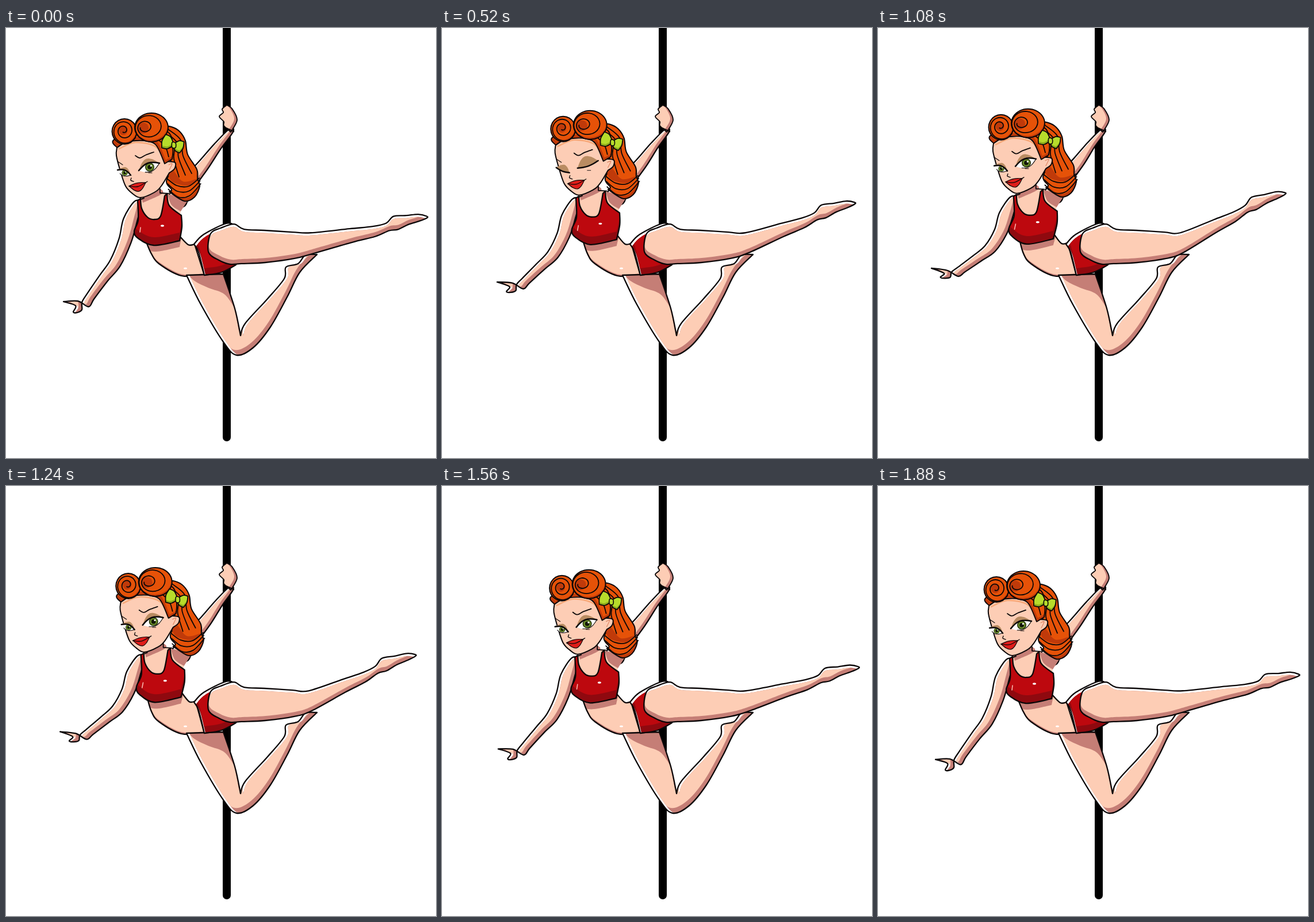
Animation, 748 px wide and 748 px high, one loop 1920 ms. Source, as an HTML page with a canvas:

```html
<!DOCTYPE html>
<html>
<head>
<meta charset="utf-8">
<style>
html, body { margin: 0; width: 100%; height: 100%; overflow: hidden; background: #fff; }
canvas { display: block; }
</style>
</head>
<body>
<canvas id="stage" width="748" height="748"></canvas>
<script>
const ctx = document.getElementById('stage').getContext('2d');
const LOOP = 1920, STEP = 40;
const INK = '#0b0708', SKIN = '#fdcdb5', SHADE = '#c57e76', RED = '#bd080e', DARK_RED = '#8f090f';
const HAIR = '#e65208', DARK_HAIR = '#c03a0a', LIME = '#b7dc2b', DARK_LIME = '#8dad1c', LID = '#b98c62';

const clamp = v => Math.max(0, Math.min(1, v));
const mix = (a, b, k) => a + (b - a) * k;
let lift = 0; // 0 = leg and arm low, 1 = high

// Each warp gives the full displacement of a point of one body part.
const still = () => [0, 0];
const head = () => [8.3, -7.6];
const torso = (x, y) => {
  const w = clamp((395 - y) / 60) * clamp((y - 180) / 60);
  return [7 * w, -7.6 * w];
};
const arm = (x, y) => {
  const reach = Math.max(0, (225 - x) * .51 + (y - 310) * .86) / 200;
  return [7 - 13 * reach ** 3, -8 - 50 * reach ** 1.5];
};
const leg = (x, y) => [
  -25 * clamp((x - 500) / 170),
  -34 * clamp((x - 532) / 137) - .14 * Math.max(0, x - 669)
];

// "x,y x,y* ..." to points; a star marks a sharp corner.
const points = text => text.split(' ').flatMap(word => {
  const p = word.split(',').map(parseFloat);
  return word.endsWith('*') ? [p, p] : [p];
});

// Bow from a to b, raised by k times its length.
function arc([ax, ay], [bx, by], k) {
  return [0, .25, .5, .75, 1].map(s => {
    const h = k * Math.sin(Math.PI * s);
    return [mix(ax, bx, s) + (by - ay) * h, mix(ay, by, s) - (bx - ax) * h];
  });
}
const lens = (a, b, top, bottom) => [...arc(a, b, top), ...arc(a, b, bottom).reverse()];

// Outline of a tapered limb along joints "x,y,radius"; tip is put at its far end.
function limb(text, tip = []) {
  const joints = points(text);
  const side = sign => joints.map(([x, y, r], i) => {
    const a = joints[Math.max(0, i - 1)], b = joints[Math.min(joints.length - 1, i + 1)];
    const dx = b[0] - a[0], dy = b[1] - a[1], len = Math.hypot(dx, dy);
    return [x + sign * r * dy / len, y - sign * r * dx / len];
  });
  return [...side(-1), ...tip, ...side(1).reverse()];
}

// Smooth curve through points.
function curve(shape, warp, closed) {
  const pts = shape.map(([x, y]) => {
    const [dx, dy] = warp(x, y);
    return [x + dx * lift, y + dy * lift];
  });
  const n = pts.length, path = new Path2D();
  const at = i => closed ? pts[(i + n) % n] : pts[Math.max(0, Math.min(n - 1, i))];
  path.moveTo(...pts[0]);
  for (let i = 0; i < (closed ? n : n - 1); i++) {
    const [a, b, c, d] = [at(i - 1), at(i), at(i + 1), at(i + 2)];
    if (Math.hypot(c[0] - b[0], c[1] - b[1]) < .01) continue;
    path.bezierCurveTo(
      b[0] + (c[0] - a[0]) / 6, b[1] + (c[1] - a[1]) / 6,
      c[0] - (d[0] - b[0]) / 6, c[1] - (d[1] - b[1]) / 6, c[0], c[1]);
  }
  if (closed) path.closePath();
  return path;
}

function line(shape, warp, width = 1.8, color = INK) {
  ctx.lineWidth = width;
  ctx.strokeStyle = color;
  ctx.stroke(curve(shape, warp));
}
function fill(shape, warp, color) {
  ctx.fillStyle = color;
  ctx.fill(curve(shape, warp, true));
}
function dot(x, y, rx, ry, color, warp) {
  const [dx, dy] = warp(x, y);
  ctx.beginPath();
  ctx.ellipse(x + dx * lift, y + dy * lift, rx, ry, 0, 0, 7);
  ctx.fillStyle = color;
  ctx.fill();
}

// Outlined shape. Moving the shape itself leaves a white rim on one side and a shadow on the other.
function part(shape, warp, base, { rim = [0, 0], shade = [0, 0], tone = SHADE, width = 2.3, inside } = {}) {
  const path = curve(shape, warp, true);
  ctx.save();
  ctx.clip(path);
  ctx.fillStyle = '#fff';
  ctx.fill(path);
  ctx.translate(...rim);
  ctx.fillStyle = tone;
  ctx.fill(path);
  ctx.clip(path);
  ctx.translate(shade[0] - rim[0], shade[1] - rim[1]);
  ctx.fillStyle = base;
  ctx.fill(path);
  ctx.translate(-shade[0], -shade[1]);
  if (inside) inside();
  ctx.restore();
  ctx.lineWidth = width;
  ctx.strokeStyle = INK;
  ctx.stroke(path);
}

const bra = points('229,300* 234,297* 236,314 246,329 258,333 269,327 276,292* 280,288* 284,309 305,326* 306,346 302,370* 257,378 230,366 223,354 230,334');

function drawPole() {
  ctx.lineWidth = 14;
  ctx.strokeStyle = '#000';
  ctx.beginPath();
  ctx.moveTo(384, -10);
  ctx.lineTo(384, 712);
  ctx.stroke();
}

function drawArms() {
  part(limb('392,178,4 368,206,7 343,239,10 312,277,13 296,303,15'), torso, SKIN, { rim: [2, 2], shade: [-4, -4] });
  part(points('384,134* 376,141 378,147 371,154 379,163 379,170 391,181* 402,160 393,140'),
    still, SKIN, { shade: [-5, -2], width: 1.9 });
  line(points('383,174 396,180'), still, 2.4);
  const hand = points('125,475 100,476* 121,483 117,494 124,495 132,490');
  part(limb('229,304,6 216,335,12 207,370,11 190,409,10 170,435,8.5 147,467,7.5 138,481,7', hand.reverse()),
    arm, SKIN, { rim: [4, 1], shade: [-6, -4] });
}

function drawTorso() {
  fill(points('243,288* 232,299* 230,345* 300,345* 304,318* 289,303 283,288* 268,287* 268,276*'), torso, SKIN);
  fill(points('236,297* 268,279* 272,288 238,304*'), torso, SHADE);
  fill(points('281,289* 318,297* 304,319* 288,308'), torso, SHADE);
  line(points('268,280 268,287* 283,288'), torso);
  line(points('240,296 229,300'), torso, 2);
  part(points('243,370* 253,393 266,410 305,431 345,430* 328,376* 317,377 302,362*'), torso, SKIN, {
    shade: [0, -3],
    inside() {
      ctx.translate(0, 11);
      fill(bra, torso, SHADE);
    }
  });
  dot(312, 418, 3, 1.6, '#fff', torso);
}

function drawLegs() {
  part(points('314,430* 339,481 378,546 401,569 430,556 460,520 489,468 511,425 541,394* 521,395 508,410 487,416 484,436 455,471 416,514 408,535* 398,488 378,428*'),
    still, SKIN, {
      rim: [5, 0], shade: [-3, -9],
      inside: () => fill(points('314,425* 328,440 352,452 381,464 402,495* 380,425*'), still, SHADE)
    });
  part(points('327,376* 344,359 383,340 400,344* 400,412* 375,425 345,430* 335,390'),
    still, RED, { rim: [3, 4], shade: [0, -12], tone: DARK_RED });
  part(limb('354,374,16 372,376,28 393,376,35 412,380,30 450,380,28 500,378,23 533,374,18 600,361,12 640,354,9 664,346,7 678,339,12 698,334,8 718,330,6 732,329,1.5'),
    leg, SKIN, { rim: [0, 4.5], shade: [1, -8] });
}

function drawTop() {
  part(bra, torso, RED, { shade: [0, -14], tone: DARK_RED });
  dot(272, 344, 3, 1.7, '#fff', torso);
  line(points('234,347 233,355'), torso, 1.6, '#f7b9b0');
}

// Strands spread evenly between two edges.
function strands(from, to, count) {
  const a = points(from), b = points(to);
  for (let i = 1; i <= count; i++) {
    const k = i / (count + 1);
    line(a.map(([x, y], j) => [mix(x, b[j][0], k), mix(y, b[j][1], k)]), head);
  }
}

function drawBackHair() {
  part(points('275,172 288,172 302,180 312,196 316,220 332,246 333,263* 337,275 328,294 310,301 284,285* 288,281 279,267 288,235 262,185'),
    head, HAIR, { tone: DARK_HAIR, width: 2, shade: [-2, -5] });
  fill(points('281,252* 290,247 308,267 333,262* 318,274 290,268'), head, DARK_HAIR);
  strands('288,172 310,190 316,220 334,250', '266,190 286,210 284,230 290,262', 3);
  strands('278,252 296,264 317,267 335,256', '284,290 300,304 320,300 340,276', 3);
}

function drawEye(a, b, closed) {
  const size = Math.hypot(b[0] - a[0], b[1] - a[1]);
  const x = (a[0] + b[0]) / 2 + 1, y = (a[1] + b[1]) / 2 + .5;
  fill(lens(a, b, .39, -.08), head, LID);
  if (closed) return line(arc(a, b, -.08), head, 2.5);
  fill(lens(a, b, .18, -.24), head, '#fff');
  dot(x, y, size * .21, size * .2, '#28370f', head);
  dot(x, y, size * .17, size * .16, '#6b8f2a', head);
  dot(x, y, size * .1, size * .1, '#111607', head);
  dot(x + size * .06, y - size * .06, size * .04, size * .04, '#fff', head);
  line(arc(a, b, -.24).slice(1), head, 1.1);
  line(arc(a, b, .18), head, 2.5);
}

function drawFace(closed) {
  part(points('193,208* 192,222 199,249 208,275 220,288 234,295 258,286 270,275 284,252* 293,245 294,234 278,232* 262,198 225,190'),
    head, SKIN, { width: 2 });
  line(points('277,234 261,207 225,199 197,210'), head, 2.5, '#f9a878');
  line(points('283,238 289,236 284,247'), head, 1.2, '#dd8562');
  drawEye([194, 247], [217, 256], closed);
  drawEye([231, 248], [267, 235], closed);
  line(points('225,222 233,226 243,221 257,216'), head);
  line(points('194,232 203,238'), head, 1.2);
  line(points('218,261 217,265 222,267'), head, 1.4);
  line(points('248,252 254,252'), head, 1);
  const corners = [[214, 275], [243, 269]];
  fill(lens(...corners, .08, -.42), head, '#df1d1a');
  line(arc(...corners, -.42), head, 1.2);
  line(arc(...corners, .08), head, 1.2);
  line(points('214,275 229,276 246,267'), head, 1.3);
}

// Rolled lock: an oval with a spiral winding towards its eye.
function coil(x, y, rx, ry, eyeX, eyeY, begin, turns) {
  const ring = (a, s) => [
    mix(x, eyeX, s) + rx * (1 - s * .85) * Math.cos(a),
    mix(y, eyeY, s) + ry * (1 - s * .85) * Math.sin(a)
  ];
  const oval = Array.from({ length: 12 }, (_, i) => ring(i * Math.PI / 6, 0));
  part(oval, head, HAIR, { shade: [-1, -3], tone: DARK_HAIR, width: 2 });
  dot(eyeX, eyeY, rx * .35, ry * .38, DARK_HAIR, head);
  line(Array.from({ length: 31 }, (_, i) => ring(begin + turns * 2 * Math.PI * i / 30, i / 30)), head);
}

function drawFrontHair() {
  part(points('193,208* 206,200 226,196 246,197 262,205 276,236* 289,228* 290,208 280,180 226,176 187,195'),
    head, HAIR, { tone: DARK_HAIR, width: 1.9, shade: [2, -6] });
  line(points('262,192 277,206 283,224'), head);
  coil(206, 180, 21.5, 22, 204, 178, .5, 2.2);
  coil(253, 173, 29, 25, 238, 174, 2, 2.2);
}

function drawBow() {
  const tilt = .33, lobe = points('1,-3* 8,-10 16,-11* 18,0 15,10* 7,9 1,3*');
  for (const scale of [-1.15, 1]) {
    const shape = lobe.map(([u, v]) => {
      const x = u * scale, y = v * Math.abs(scale);
      return [291 + x * Math.cos(tilt) - y * Math.sin(tilt), 203 + x * Math.sin(tilt) + y * Math.cos(tilt)];
    });
    part(shape, head, LIME, { tone: DARK_LIME, shade: [0, -4], width: 1.8 });
  }
  part(points('289,199 295,200 295,208 289,208'), head, LIME, { width: 1.6 });
}

function draw(t) {
  lift = (1 - Math.cos(2 * Math.PI * t / LOOP)) / 2;
  ctx.fillStyle = '#fff';
  ctx.fillRect(0, 0, 748, 748);
  ctx.lineCap = ctx.lineJoin = 'round';
  drawPole();
  drawArms();
  drawTorso();
  drawLegs();
  drawTop();
  drawBackHair();
  drawFace(t >= 200 && t < 920);
  drawFrontHair();
  drawBow();
}

const start = performance.now();
function tick() {
  const t = (performance.now() - start) % LOOP;
  draw(Math.floor(t / STEP) * STEP);
  requestAnimationFrame(tick);
}
tick();
</script>
</body>
</html>
```
